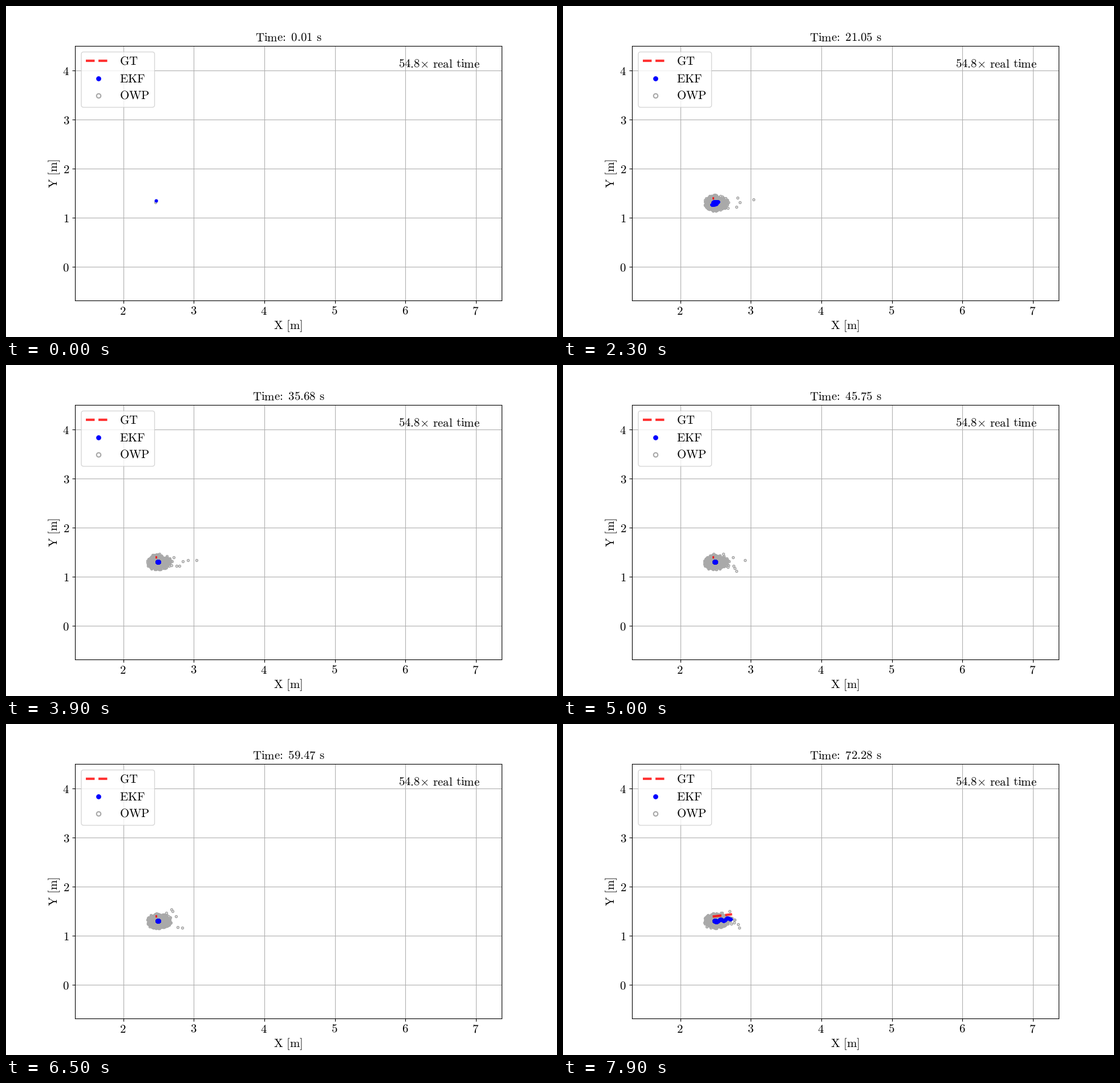
Recreate the animation shown at these times as a matplotlib script. Size 966 px wide and 580 px high, loop 8 s.

```python
import matplotlib.pyplot as plt
import numpy as np
from matplotlib.animation import FuncAnimation
from matplotlib.patches import FancyBboxPatch
from matplotlib.transforms import ScaledTranslation

W, H, DPI = 966, 580, 100
FRAMES, STEP = 80, 0.91485   # seconds of log time per frame
WINDOW = 20                  # seconds of history kept on screen
MOVE = 69.0                  # the tag starts to move here
GRAY = "darkgray"

plt.rcParams.update({"mathtext.fontset": "cm", "font.size": 15,
                     "text.hinting": "none"})


def tex(*words):
    return "$" + r"\hspace{0.39}".join(r"\text{%s}" % w for w in words) + "$"


def title_at(t):
    clock = int(t * 100 + 1e-6) / 100
    return (r"$\text{Time:}\hspace{0.53}\text{%.2f}\hspace{0.39}\text{s}$"
            % clock)


def advance(t):
    """Pixels travelled along x since the tag started to move."""
    return 31 * (np.clip(t - MOVE, 0, None) / 3.28) ** 1.4


# Axes and fixed labels
fig, ax = plt.subplots(figsize=(W / DPI, H / DPI), dpi=DPI)
ax.set(xlim=(1.3128, 7.3668), ylim=(-0.683, 4.51))
ax.set_xticks(range(2, 8), [f"${v}$" for v in range(2, 8)])
ax.set_yticks(range(5), [f"${v}$" for v in range(5)])
ax.grid(True)
title = ax.set_title(title_at(0.01), fontsize=15)
nudge = ScaledTranslation(-1 / DPI, 1 / DPI, fig.dpi_scale_trans)
for label in ax.get_xticklabels():
    label.set_transform(label.get_transform() + nudge)

# Overlay measured in pixels from the top left
page = fig.add_axes([0, 0, 1, 1], xlim=(0, W), ylim=(H, 0), zorder=2)
page.axis("off")
page.text(495, 566, tex("X", "[m]"), ha="center", va="baseline")
page.text(90, 293, tex("Y", "[m]"), ha="center", va="baseline",
          rotation=90, rotation_mode="anchor")
page.text(688.5, 108, r"$\text{54.8}{\times}\hspace{0.39}\text{real}"
          r"\hspace{0.39}\text{time}$", va="baseline")

gt_style = dict(color="red", alpha=0.8, lw=3, ls="--")
ring = dict(ls="", marker="o", mfc="none", mec=GRAY)
dot = dict(ls="", marker="o", color="blue", mew=0)

# Legend
page.add_patch(FancyBboxPatch(
    (132, 80.5), 128.5, 97, boxstyle="round,pad=0,rounding_size=4.2",
    fc="white", ec="0.8", lw=1, alpha=0.8, zorder=4))
page.plot([140, 181.7], [96.4, 96.4], zorder=5, **gt_style)
page.plot([161.5], [127.2], ms=6.3, zorder=5, **dot)
page.plot([161.5], [157.2], ms=5.4, mew=1.5, zorder=5, **ring)
for row, name in enumerate(("GT", "EKF", "OWP")):
    page.text(199, 104 + 30 * row, tex(name), va="baseline", zorder=5)

# Raw positions: a dense cloud, with a few readings straying to the right
rng = np.random.default_rng(7)
raw_t = 0.01 + np.arange(0, 73, 0.02)
count = len(raw_t)
g = rng.normal(size=(3 * count, 2))
g = g[np.hypot(g[:, 0], g[:, 1]) < 2.6][:count].T
stray = rng.random(count) < 0.025
tail_x = np.minimum(rng.exponential(14, count), 50) * stray
tail_y = rng.normal(0, 4, count) * stray
raw_x = 265.8 + 8.4 * g[0] + 0.5 * g[0] ** 2 + tail_x + 0.8 * advance(raw_t)
raw_y = 345 + 5.4 * g[1] + tail_y - 0.1 * advance(raw_t)
raw_x[0], raw_y[0] = 261.5, 344

# Filtered track: a damped swing, then a slow wobble that trails the tag
ekf_t = 0.01 + np.arange(0, 73, 0.04)
decay = np.exp(-ekf_t / 4)
shift = 0.87 * advance(ekf_t)
ekf_x = (266.5 + 9 * decay * np.sin(3 * ekf_t - 0.4)
         + 1.6 * (1 - decay) * np.sin(0.9 * ekf_t) + shift)
ekf_y = (345 - 4.3 * decay * np.cos(2 * ekf_t)
         + 0.6 * (1 - decay) * np.cos(0.9 * ekf_t)
         - 0.17 * shift + 1.8 * np.sin(shift * 2 * np.pi / 11.5))

raw, = page.plot([], [], ms=2.7, mew=1.2, zorder=1, **ring)
gt, = page.plot([], [], zorder=2, **gt_style)
ekf, = page.plot([], [], ms=4.4, zorder=3, **dot)


def recent(times, t):
    return (times <= t + 1e-6) & (times > t - WINDOW)


def draw(n):
    t = 0.01 + n * STEP
    title.set_text(title_at(t))
    keep = recent(raw_t, t)
    raw.set_data(raw_x[keep], raw_y[keep])
    keep = recent(ekf_t, t)
    ekf.set_data(ekf_x[keep], ekf_y[keep])
    gone = advance(t)
    gt.set_data([262.4, 265.4 + gone] if n else [],
                [337.4, 337.4 - 0.13 * gone] if n else [])
    return title, raw, ekf, gt


anim = FuncAnimation(fig, draw, frames=FRAMES, interval=100,
                     repeat=True, repeat_delay=0, blit=False)
plt.show()
```
